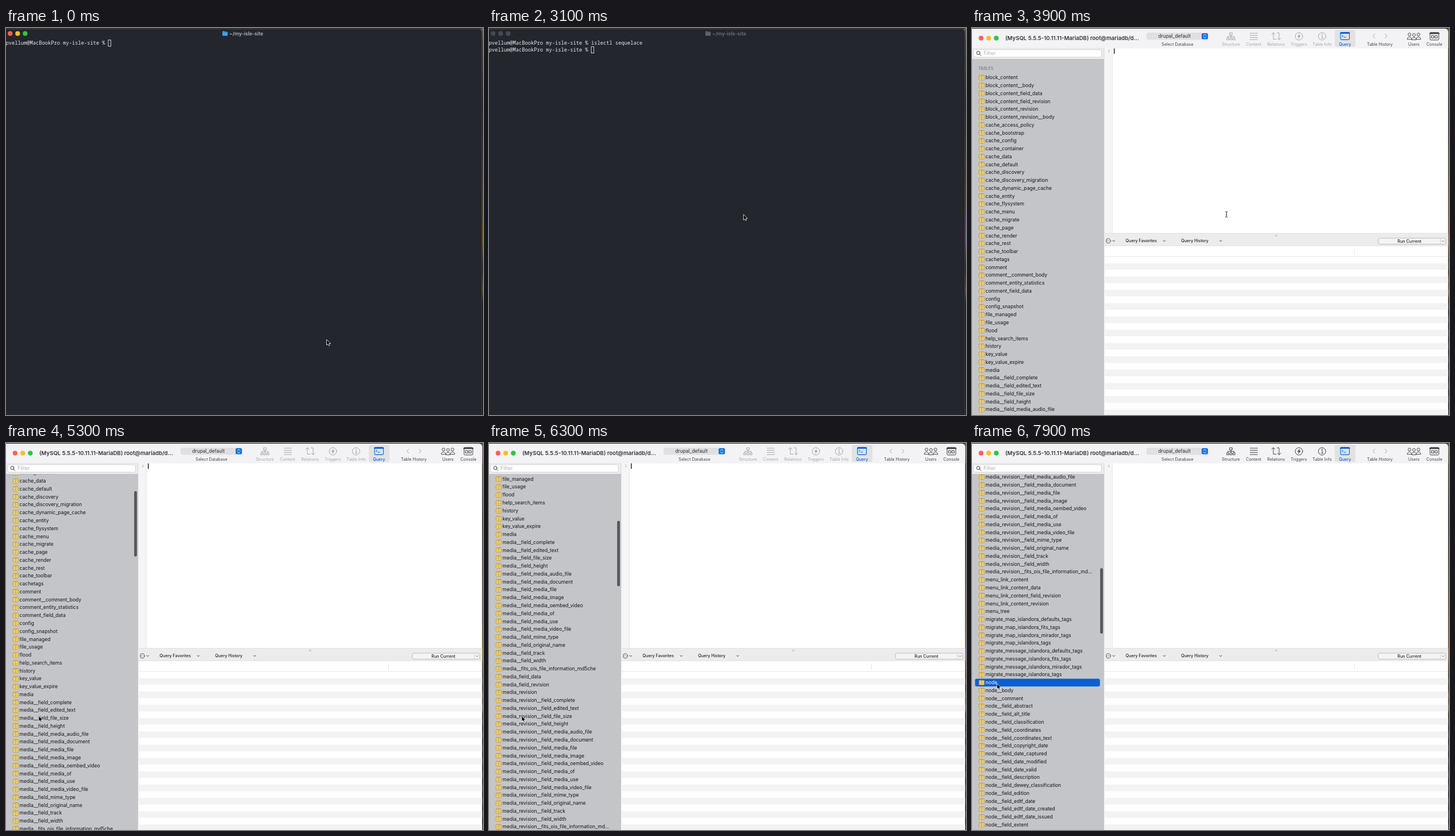
An HTML page for the animation above (8000 ms loop, 831 by 674 pixels).

```html
<!DOCTYPE html>
<html lang="en">
<head>
<meta charset="utf-8">
<title>Opening a database from the terminal</title>
<style>
  html, body { margin: 0; width: 100%; height: 100%; overflow: hidden; background: #000; }
  svg { display: block; width: 831px; height: 674px; font: 7.2px Inter, sans-serif; }
  text { white-space: pre; }
  .mono { font: 8.75px "Noto Sans Mono", monospace; fill: #e8e9ea; }
  .mid { text-anchor: middle; }
  .line { fill: none; stroke: currentColor; stroke-width: 1; stroke-linecap: round; stroke-linejoin: round; }
  .rows { font-size: 8.5px; fill: #151516; }
  .medium { font-weight: 500; fill: #222; }
</style>
</head>
<body>
<svg viewBox="0 0 831 674">
  <defs>
    <linearGradient id="desktop" x2="0" y2="1">
      <stop offset="0" stop-color="#6d6045"/><stop offset=".04" stop-color="#4a3a22"/>
      <stop offset=".2" stop-color="#17130d"/><stop offset=".4" stop-color="#4a3012"/>
      <stop offset=".55" stop-color="#7a4c1b"/><stop offset=".62" stop-color="#1a120a"/>
      <stop offset=".68" stop-color="#6e4519"/><stop offset=".71" stop-color="#08080a"/>
    </linearGradient>
    <clipPath id="frame"><rect x="-10" y="1" width="839.5" height="690" rx="6"/></clipPath>
    <clipPath id="listArea"><rect y="54.5" width="229.5" height="620"/></clipPath>
    <pattern id="stripes" y="398" width="600" height="23.16" patternUnits="userSpaceOnUse">
      <rect y="11.58" width="600" height="11.58" fill="#f3f3f4"/>
    </pattern>
    <g id="tableIcon">
      <rect x="12.2" y="-4" width="9.2" height="8" rx=".8" fill="#fbe79b" stroke="#b98d24" stroke-width=".8"/>
      <path d="M12.4-3.4H21.2" stroke="#d9a52f" stroke-width="1.2"/>
      <path d="M12.4-1H21.2M12.4 1.5H21.2M16.8-4V4" stroke="#b98d24" stroke-width=".7"/>
    </g>
    <g id="person">
      <circle cy="-3.2" r="2.5"/><path d="M-4 5.2C-4-.2 4-.2 4 5.2Z"/>
    </g>
  </defs>
  <rect width="831" height="674" fill="url(#desktop)"/>
  <rect width="829" height="1" fill="#191b17"/>

  <g id="terminal">
    <rect x="-10" y="1.2" width="839.4" height="690" rx="6" fill="#23262d" stroke="#595b5e" stroke-width=".7"/>
    <circle class="light" cx="7.2" cy="9.7" r="4.1"/>
    <circle class="light" cx="20.3" cy="9.7" r="4.1"/>
    <circle class="light" cx="33.4" cy="9.7" r="4.1"/>
    <g id="heading">
      <path id="folder" d="M377 6.5Q377 5.6 378 5.6H380.4L381.4 6.6H385.2Q386.2 6.6 386.2 7.6V12.6Q386.2 13.6 385.2 13.6H378Q377 13.6 377 12.6Z"/>
      <path d="M377.2 8.2H386" stroke="#23262d" stroke-width=".5" opacity=".5"/>
      <text id="path" x="389" y="12.7" font-size="8.5" font-weight="700">~/my-isle-site</text>
    </g>
    <text class="mono" id="line1" x="-.5" y="29.4"></text>
    <text class="mono" id="line2" x="-.5" y="41.1"></text>
    <rect id="block" width="4.6" height="11" fill="none" stroke="#e4e5e6" stroke-width=".9"/>
  </g>

  <g id="app" clip-path="url(#frame)">
    <rect width="831" height="674" fill="#fff"/>
    <rect width="831" height="35.5" fill="#f3f2f4"/>
    <circle cx="15.8" cy="17.7" r="4.1" fill="#ff5f57"/>
    <circle cx="29.1" cy="17.7" r="4.1" fill="#febc2e"/>
    <circle cx="42.3" cy="17.7" r="4.1" fill="#28c840"/>
    <text x="58" y="21" font-size="9.6" font-weight="600" fill="#333335">(MySQL 5.5.5-10.11.11-MariaDB) root@mariadb/d...</text>

    <rect x="304" y="8" width="108" height="12.5" rx="3.5" fill="#e0dfe2"/>
    <text class="mid" x="352.7" y="17.3" font-size="8.4" fill="#2b2b2c">drupal_default</text>
    <rect x="400" y="9" width="11" height="10.6" rx="2.6" fill="#1672e8"/>
    <path class="line" color="#fff" d="M403.5 13L405.5 11L407.5 13M403.5 15.6L405.5 17.6L407.5 15.6"/>
    <text class="mid" x="358" y="31" fill="#444">Select Database</text>

    <g id="tools">
      <g class="line">
        <path d="M449 8.3H453.4V12H449ZM451.2 12V17M445.8 17V14.6H456.6V17M444.2 17.2H447.4V20.6H444.2ZM449.6 17.2H452.8V20.6H449.6ZM455 17.2H458.2V20.6H455Z"/>
        <path d="M484.4 9H497.4M484.4 12.7H497.4M484.4 16.4H497.4M484.4 20.1H497.4"/>
        <path d="M522 11L525 8L528 11M525 8V19.5H530M531.5 8.5H535V20.5M532 17.5L535 20.5L538 17.5"/>
        <circle cx="569.6" cy="14.5" r="6.5"/>
        <circle cx="609.9" cy="14.5" r="6.5"/>
        <path d="M609 13H610.2V17.6M608.6 17.8H611.8"/>
      </g>
      <path d="M571.2 9.4L566.6 15.3H569.2L568 19.6L572.8 13.5H570.1Z" fill="currentColor"/>
      <circle cx="609.8" cy="10.8" r=".9" fill="currentColor"/>
    </g>
    <rect x="632" y="3" width="36" height="30" rx="3.5" fill="#e2e2e4"/>
    <g class="line" color="#0b62d6">
      <rect x="642" y="7.6" width="15.5" height="12.8" rx="1.6" stroke-width="1.1"/>
      <path d="M642 8.9H657.5" stroke-width="2.2"/>
      <path d="M644.4 12L646.6 13.8L644.4 15.6M648 16H651"/>
    </g>
    <path class="line" color="#aaaaac" d="M702 10.5L698.5 14.2L702 17.9M719.5 10.5L723 14.2L719.5 17.9"/>
    <g fill="#f3f2f4" stroke="#4a4a4c" stroke-width="1">
      <use href="#person" x="762.2" y="14.5"/><use href="#person" x="777.8" y="14.5"/>
      <use href="#person" x="770" y="15.3"/>
    </g>
    <g class="line" color="#414143">
      <rect x="798" y="7.8" width="15.2" height="13" rx="1.4"/>
      <path d="M798 9.2H813.2" stroke-width="2.4"/>
      <path d="M800.8 13.4H804.6V17.4H800.8ZM806.8 13.4H810.6V17.4H806.8Z"/>
    </g>

    <rect y="35.5" width="230" height="639" fill="#c4c5c9"/>
    <g id="list" clip-path="url(#listArea)">
      <g id="scroller" class="rows">
        <text x="10.8" y="73.4" font-size="7" font-weight="600" fill="#85868a">TABLES</text>
      </g>
      <rect id="thumb" x="223.3" width="4.8" height="114" rx="2.4" fill="#56575b"/>
    </g>
    <rect y="35.5" width="230" height="18.7" fill="#ededee"/>
    <path d="M0 54.4H230" stroke="#b5b6b9" stroke-width=".6"/>
    <rect x="2.6" y="37.8" width="223" height="13" rx="3" fill="#fff" stroke="#c3c3c6" stroke-width=".7"/>
    <g class="line" color="#333"><circle cx="11" cy="43.4" r="2.9"/><path d="M13.2 45.6L15.6 48"/></g>
    <text x="20" y="47.2" font-size="9" fill="#b0b0b3">Filter</text>

    <rect x="230" y="35.5" width="14.5" height="322" fill="#f5f5f6"/>
    <path d="M230 35.5V674" stroke="#c9c9cb" stroke-width=".7"/>
    <path d="M244.5 35.5V357" stroke="#dcdcde" stroke-width=".6"/>
    <text x="236.8" y="41.6" style="font:6px 'Noto Sans Mono',monospace" fill="#858588">1</text>
    <rect id="caret" x="247.2" y="35.6" width="1.3" height="9.4" fill="#000"/>

    <rect x="230.4" y="357.4" width="600" height="22" fill="#ececed"/>
    <path d="M230 357.5H831M230 379.4H831" stroke="#d5d5d7" stroke-width=".6"/>
    <circle cx="530" cy="361.2" r="1.8" fill="#cbcbcd"/>
    <g class="line" color="#333">
      <circle cx="237.6" cy="370.8" r="4" stroke-width=".8"/>
      <path d="M235.7 370.8h.01M237.6 370.8h.01M239.5 370.8h.01"/>
      <path d="M245 370L246.8 371.8L248.6 370M333.2 370L335 371.8L336.8 370M431.4 370L433.2 371.8L435 370"/>
    </g>
    <text class="medium" x="267.6" y="373.4">Query Favorites</text>
    <text class="medium" x="364.2" y="373.4">Query History</text>
    <rect x="707.8" y="366" width="117.5" height="10.4" rx="2.5" fill="#f4f4f5" stroke="#a6a6a9" stroke-width=".7"/>
    <text class="mid medium" x="762" y="373.8">Run Current</text>
    <path d="M816 367.5V375" stroke="#bbb" stroke-width=".6"/>
    <path class="line" color="#777" stroke-width=".7" d="M819 370.6L820.6 372.2L822.2 370.6"/>
    <path d="M666.3 384V395M230.4 397.8H831" stroke="#d8d8da" stroke-width=".7"/>
    <rect x="230.4" y="398" width="600" height="276" fill="url(#stripes)"/>
    <g id="labels" class="mid"></g>
  </g>

  <path id="arrow" d="M0 0V9.7L2.2 7.7L3.7 11L5.4 10.2L4 7.1H7Z" fill="#000" stroke="#fff" stroke-width=".8" stroke-linejoin="round"/>
  <path id="beam" d="M-2.2-4.8Q0-4.8 0-3.6Q0-4.8 2.2-4.8M0-3.8V3.8M-2.2 4.8Q0 4.8 0 3.6Q0 4.8 2.2 4.8M-1 .8H1" fill="none" stroke="#222" stroke-width=".9"/>
</svg>

<script>
const LOOP = 8000, STEP = 100, PITCH = 13.767, CHAR = 5.25;
const PROMPT = 'pvellum@MacBookPro my-isle-site % ', COMMAND = 'islectl sequelace';
const $ = id => document.getElementById(id);
const add = (parent, tag, attrs, text = '') => {
  const node = document.createElementNS('http://www.w3.org/2000/svg', tag);
  for (const key in attrs) node.setAttribute(key, attrs[key]);
  node.textContent = text;
  parent.append(node);
  return node;
};
const set = (id, attrs) => { for (const key in attrs) $(id).setAttribute(key, attrs[key]); };
const show = (id, on) => set(id, { visibility: on ? 'visible' : 'hidden' });
const names = (prefix, words) => words.split(' ').map(word => prefix + word);

const mediaFields = 'complete edited_text file_size height media_audio_file media_document media_file media_image media_oembed_video media_of media_use media_video_file mime_type original_name track width';
const tags = ['islandora_defaults_tags', 'islandora_fits_tags', 'islandora_mirador_tags', 'islandora_tags'].join(' ');
const tables = [
  'block_content', ...names('block_content_', '_body field_data field_revision revision revision__body'),
  ...names('cache_', 'access_policy bootstrap config container data default discovery discovery_migration dynamic_page_cache entity flysystem menu migrate page render rest toolbar'),
  ...names('', 'cachetags comment comment__comment_body comment_entity_statistics comment_field_data config config_snapshot file_managed file_usage flood help_search_items history key_value key_value_expire media'),
  ...names('media__field_', mediaFields), 'media__fits_ois_file_information_md5che',
  ...names('media_', 'field_data field_revision revision'),
  ...names('media_revision__field_', mediaFields), 'media_revision__fits_ois_file_information_md...',
  'menu_link_content', ...names('menu_link_content_', 'data field_revision revision'), 'menu_tree',
  ...names('migrate_map_', tags), ...names('migrate_message_', tags),
  'node', 'node__body', 'node__comment',
  ...names('node__field_', 'abstract alt_title classification coordinates coordinates_text copyright_date date_captured date_modified date_valid description dewey_classification edition edtf_date edtf_date_created edtf_date_issued extent')
];
const rowY = i => 86.3 + i * PITCH;
const nodeRow = tables.indexOf('node');
add($('scroller'), 'rect', { id: 'selection', x: 5.3, y: rowY(nodeRow) - 6.7, width: 217.6, height: 13.5, rx: 3, fill: '#0a60d2' });
const rowTexts = tables.map((name, i) => {
  add($('scroller'), 'use', { href: '#tableIcon', y: rowY(i) });
  return add($('scroller'), 'text', { x: 23.6, y: rowY(i) + 2.9 }, name);
});

const label = (x, text, parent = $('labels'), fill = '#444', weight = 400) =>
  add(parent, 'text', { x, y: 31, fill, class: 'mid', 'font-weight': weight }, text);
[[451, 'Structure'], [490.6, 'Content'], [529.6, 'Relations'], [569.4, 'Triggers'], [610, 'Table Info']]
  .forEach(([x, text]) => label(x, text, $('tools'), 'currentColor'));
label(649.8, 'Query', $('labels'), '#0b62d6', 500);
[[710.5, 'Table History'], [770, 'Users'], [805.5, 'Console']].forEach(([x, text]) => label(x, text));

// Keys are [time, ...values], joined by straight runs.
const pointer = [
  [0, 558.5, 542.5], [100, 560, 535], [200, 560, 535], [300, 546, 523.5], [1900, 546, 523.5],
  [2300, 525, 623], [2700, 482, 534], [2800, 482, 534], [3100, 443.3, 324.7], [4400, 443.3, 324.7],
  [4700, 173, 318.5], [4800, 173, 318.5], [5000, 57, 475.3], [7500, 57, 475.3], [7700, 43.5, 419]
];
const scroll = [[4800, 0], [5800, 315.4], [6300, 436.5], [6600, 690], [6900, 860], [7200, 877], [7500, 880.5]];
const typing = [[1000, 2], [1100, 4], [1200, 6], [1300, 8], [1600, 13], [1700, 17]];

function at(keys, t) {
  const next = keys.findIndex(key => key[0] > t);
  if (next < 0) return keys[keys.length - 1].slice(1);
  if (next === 0) return keys[0].slice(1);
  const a = keys[next - 1], b = keys[next], k = (t - a[0]) / (b[0] - a[0]);
  return a.slice(1).map((v, i) => v + (b[i + 1] - v) * k);
}

function drawTerminal(t) {
  const active = t < 2900, entered = t >= 2000, ready = t >= 2400;
  const typed = typing.reduce((n, [time, count]) => t >= time ? count : n, 0);
  document.querySelectorAll('.light').forEach((light, i) =>
    light.setAttribute('fill', active ? ['#ff5f57', '#febc2e', '#28c840'][i] : '#464950'));
  set('folder', { fill: active ? '#3fa7ef' : '#60636a' });
  set('path', { fill: active ? '#a4a7ab' : '#656970' });
  $('line1').textContent = PROMPT + COMMAND.slice(0, typed);
  $('line2').textContent = ready ? PROMPT : '';
  const column = entered ? (ready ? PROMPT.length : 0) : PROMPT.length + typed;
  set('block', { x: column * CHAR - .4, y: entered ? 32.6 : 20.9 });
}

function drawApp(t) {
  const [offset] = at(scroll, t), selected = t >= 7800;
  show('app', t >= 3500);
  $('list').style.display = t >= 3800 ? '' : 'none';
  set('scroller', { transform: `translate(0 ${-offset})` });
  set('thumb', { y: 54.5 + offset * .1858, opacity: t >= 4900 ? 1 : 0 });
  set('selection', { opacity: selected ? 1 : 0 });
  rowTexts[nodeRow].setAttribute('fill', selected ? '#fff' : '#151516');
  set('tools', { color: selected ? '#464648' : '#a8a8aa' });
  set('caret', { opacity: t >= 3900 && (t - 3900) % 1100 < 550 ? 1 : 0 });
}

function frame(now) {
  const t = Math.floor(now % LOOP / STEP) * STEP;
  drawTerminal(t);
  drawApp(t);
  const [x, y] = at(pointer, t), overEditor = t >= 3500 && x > 230;
  show('arrow', !overEditor);
  show('beam', overEditor);
  set(overEditor ? 'beam' : 'arrow', { transform: `translate(${x} ${y})` });
  requestAnimationFrame(frame);
}
frame(performance.now());
</script>
</body>
</html>
```
